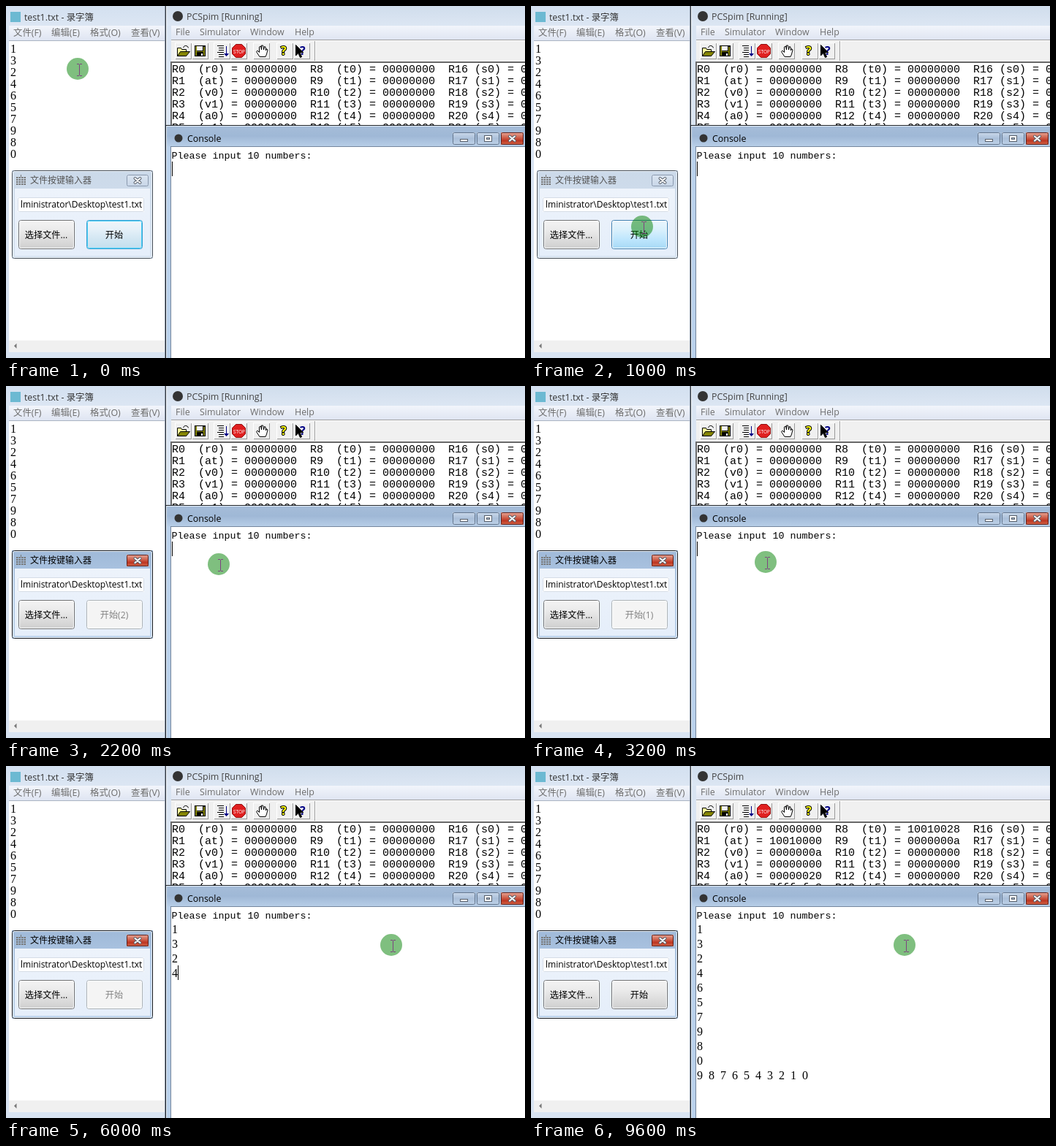
Animation, 710 px wide and 482 px high, one loop 9800 ms. Source, as an HTML page with a canvas:

```html
<!DOCTYPE html>
<html lang="zh">
<head>
<meta charset="utf-8">
<style>
html, body { margin: 0; width: 100%; height: 100%; overflow: hidden; background: #fff; }
canvas { display: block; }
</style>
</head>
<body>
<canvas id="stage" width="710" height="482"></canvas>
<script>
const ctx = document.getElementById('stage').getContext('2d');
const LOOP = 9800, STEP = 200;
const UI = '"Open Sans", "Noto Sans CJK SC", "Noto Sans CJK", sans-serif';
const MONO = '"Liberation Mono", monospace';
const SERIF = '"Liberation Serif", serif';
const DIGITS = [...'1324657980'];

// Timeline in ms
const CLICK = 1200, FOCUS = 2130, TYPE = 5200, KEY = 260, DONE = 7700, READY = 8200;

// Pointer stops: time, x, y
const PATH = [
  [0, 98, 86], [200, 104, 102], [400, 122, 165], [600, 142, 250], [800, 151, 299],
  [1200, 153, 305], [1400, 210, 283], [1600, 280, 251], [2000, 285, 248],
  [2400, 296, 240], [2600, 307, 240], [3000, 307, 240], [3200, 321, 241],
  [3600, 450, 245], [4000, 522, 245], [4200, 527, 245], [9400, 527, 245], [9600, 511, 245]
];

function rect(x, y, w, h, fill) {
  ctx.fillStyle = fill;
  ctx.fillRect(x, y, w, h);
}

function frame(x, y, w, h, color, r = 0) {
  ctx.strokeStyle = color;
  ctx.lineWidth = 1;
  ctx.beginPath();
  ctx.roundRect(x + .5, y + .5, w - 1, h - 1, r);
  ctx.stroke();
}

function shade(x, y, w, h, ...colors) {
  const g = ctx.createLinearGradient(0, y, 0, y + h);
  colors.forEach((c, i) => g.addColorStop(i / (colors.length - 1), c));
  rect(x, y, w, h, g);
}

function text(s, x, y, color = '#000', size = 12.4, family = UI) {
  ctx.font = `${size}px ${family}`;
  ctx.fillStyle = color;
  ctx.fillText(s, x, y);
}

function shape(points, fill, stroke) {
  ctx.beginPath();
  points.forEach(([x, y]) => ctx.lineTo(x, y));
  ctx.closePath();
  if (fill) { ctx.fillStyle = fill; ctx.fill(); }
  if (stroke) { ctx.strokeStyle = stroke; ctx.lineWidth = 1; ctx.stroke(); }
}

function dot(x, y, r, fill) {
  ctx.fillStyle = fill;
  ctx.beginPath();
  ctx.arc(x, y, r, 0, 7);
  ctx.fill();
}

function cross(x, y, color) {
  ctx.lineCap = 'round';
  for (const [c, w] of [['#58606c', 4], [color, 2]]) {
    ctx.strokeStyle = c;
    ctx.lineWidth = w;
    ctx.beginPath();
    ctx.moveTo(x - 3.5, y - 3); ctx.lineTo(x + 3.5, y + 3);
    ctx.moveTo(x + 3.5, y - 3); ctx.lineTo(x - 3.5, y + 3);
    ctx.stroke();
  }
  ctx.lineCap = 'butt';
}

function closeButton(x, y, w, h, active) {
  if (active) shade(x, y, w, h, '#e8a798', '#d4705c', '#bd3521', '#d4684a');
  else shade(x, y, w, h, '#dbe5f1', '#c8d6e8');
  frame(x, y, w, h, active ? '#5e2420' : '#8a99ae', 2);
  cross(x + w / 2, y + h / 2, '#fff');
}

function notepad() {
  shade(0, 0, 218, 27, '#d3e0f0', '#dce6f3');
  rect(0, 27, 218, 455, '#d9e4f2');
  rect(6, 8, 14, 14, '#6cb9d2');
  text('test1.txt - 录字簿', 25, 20, '#333');
  shade(4, 27, 214, 20, '#f2f5fb', '#dfe5f2');
  ['文件(F)', '编辑(E)', '格式(O)', '查看(V)'].forEach((s, i) =>
    text(s, [10, 62, 115, 171][i], 41, '#6d6d6d'));
  rect(4, 47, 214, 1, '#aab4c2');
  rect(4, 48, 214, 410, '#fff');
  DIGITS.forEach((d, i) => text(d, 6, 64 + 16 * i, '#000', 16, SERIF));
  rect(4, 458, 214, 16, '#f0f0f0');
  shape([[11, 465.5], [14.5, 462], [14.5, 469]], '#777');
}

function toolbar() {
  rect(226, 46, 484, 31, '#f0f0f0');
  rect(226, 46, 484, 1, '#a0a0a0');
  rect(226, 47, 484, 1, '#fff');
  rect(422, 48, 1, 27, '#a0a0a0');
  rect(423, 48, 1, 27, '#fff');
  for (const x of [231, 254, 284, 307, 338, 370, 393]) {
    rect(x, 50, 23, 23, '#fff');
    rect(x + 1, 51, 22, 22, '#9a9a9a');
    rect(x + 1, 51, 21, 21, '#f0f0f0');
  }
  // open
  shape([[234.5, 68.5], [234.5, 57.5], [239.5, 57.5], [240.5, 59.5], [246.5, 59.5], [246.5, 68.5]], '#ffff9c', '#000');
  shape([[234.5, 68.5], [238.5, 62.5], [251.5, 62.5], [246.5, 68.5]], '#848400', '#000');
  ctx.beginPath();
  ctx.arc(246, 58, 3.5, 3.4, 6.1);
  ctx.stroke();
  // save
  rect(258, 54, 15, 15, '#000');
  rect(259, 55, 2, 13, '#848400');
  rect(270, 56, 2, 12, '#848400');
  rect(261, 55, 8, 6, '#f0f0f0');
  rect(259, 62, 13, 1, '#848400');
  rect(267, 65, 2, 3, '#fff');
  // step
  for (let i = 0; i < 6; i++) rect(289 + (i % 3 ? 2 : 0), 54 + 3 * i, i % 3 ? 7 : 9, 1, '#000');
  rect(301, 55, 1, 12, '#000084');
  shape([[298, 65], [305, 65], [301.5, 69]], '#000084');
  // stop
  shape([[314.5, 52.5], [322.5, 52.5], [327.5, 57.5], [327.5, 65.5], [322.5, 70.5], [314.5, 70.5], [309.5, 65.5], [309.5, 57.5]], '#e02020', '#901010');
  text('STOP', 311, 64.5, '#fff', 6.5, 'bold, ' + UI);
  // hand
  shape([[347, 69.5], [342.5, 62.5], [344, 61], [346.5, 63.5], [346.5, 56], [348.5, 55], [349.5, 60], [349.5, 54], [351.5, 54], [352.5, 60], [353.5, 55.5], [355, 56], [355.5, 61], [356.5, 58.5], [358, 60], [356.5, 66], [355, 69.5]], '#fff', '#000');
  // help
  for (const [x, fill] of [[376, '#ff0'], [402, '#000084']]) {
    ctx.font = 'bold 16px ' + UI;
    ctx.strokeStyle = '#000';
    ctx.lineWidth = 2;
    if (x < 400) ctx.strokeText('?', x, 67);
    ctx.fillStyle = fill;
    ctx.fillText('?', x, 67);
  }
  arrow(396, 53, '#000', .85);
}

function arrow(x, y, fill, scale = 1) {
  const p = [[0, 0], [0, 17], [4, 13], [7, 20], [9.5, 19], [6.5, 12], [12, 12]];
  shape(p.map(([a, b]) => [x + .5 + a * scale, y + .5 + b * scale]), fill, '#000');
}

function registers(done) {
  const names = ['r0', 'at', 'v0', 'v1', 'a0', 'a1', 't0', 't1', 't2', 't3', 't4', 't5', 's0', 's1', 's2', 's3', 's4', 's5'];
  const results = { at: '10010000', v0: '0000000a', a0: '00000020', a1: '7fffefc8', t0: '10010028', t1: '0000000a' };
  ctx.save();
  ctx.beginPath();
  ctx.rect(227, 78, 483, 85);
  ctx.clip();
  names.forEach((name, i) => {
    const col = Math.floor(i / 6), row = i % 6;
    const value = done && results[name] || '00000000';
    const label = ('R' + (col * 8 + row)).padEnd(4);
    text(`${label}(${name}) = ${value}`, 227 + 189 * col, 91 + 16 * row, '#000', 15, MONO);
  });
  ctx.restore();
}

function simulator(done) {
  shade(218, 0, 492, 27, '#d0ddec', '#dce6f3');
  rect(218, 27, 8, 455, '#d9e4f2');
  rect(217, 0, 1, 482, '#8995a5');
  rect(218, 0, 1, 482, '#30363e');
  rect(219, 0, 1, 482, '#f4f8fc');
  dot(235, 14, 7, '#333');
  text(done ? 'PCSpim' : 'PCSpim [Running]', 247, 19, '#444');
  shade(226, 27, 484, 19, '#f2f5fb', '#dfe5f2');
  ['File', 'Simulator', 'Window', 'Help'].forEach((s, i) =>
    text(s, [232, 265, 334, 395][i], 40, '#6d6d6d'));
  toolbar();
  rect(225, 76, 485, 87, '#696969');
  rect(227, 78, 483, 85, '#fff');
  registers(done);
}

function caretShown(t) {
  if (t < CLICK) return t < 300 || t >= 830;
  if (t < FOCUS) return false;
  if (t < TYPE) return Math.floor((t - 3190 + 5300) / 530) % 2 === 0;
  if (t < DONE) return true;
  return t < 8520 || (t >= 9050 && t < 9580);
}

function consoleWindow(t) {
  const active = t < CLICK || t >= FOCUS;
  if (active) shade(218, 163, 492, 30, '#a6bdd9', '#9fb8d6', '#b9cfe8');
  else shade(218, 163, 492, 30, '#d0ddeb', '#d8e3f0', '#dce7f3');
  rect(218, 193, 8, 289, active ? '#b9d0ea' : '#d9e5f2');
  rect(218, 163, 492, 1, active ? '#1c2128' : '#596371');
  rect(218, 163, 1, 319, active ? '#1c2128' : '#596371');
  rect(219, 164, 491, 1, '#e8f1fa');
  rect(219, 164, 1, 318, '#e8f1fa');
  rect(225, 192, 485, 1, '#74869d');
  rect(225, 192, 1, 290, '#74869d');
  rect(226, 193, 484, 289, '#fff');
  dot(236, 181, 5.5, '#333');
  text('Console', 248, 186, active ? '#000' : '#555');

  for (const x of [611, 644]) {
    if (active) shade(x, 173, 31, 17, '#cbd9ea', '#abc0da', '#bfd2e8');
    else shade(x, 173, 31, 17, '#dde7f2', '#d0ddeb');
    frame(x, 173, 31, 17, active ? '#65778e' : '#8a99ae', 2);
  }
  rect(621, 182, 11, 4, '#58606c');
  rect(622, 183, 9, 2, '#fff');
  rect(654, 177, 11, 9, '#58606c');
  rect(655, 178, 9, 7, '#fff');
  rect(657, 180, 5, 3, '#58606c');
  rect(658, 181, 3, 1, '#b0c0d4');
  closeButton(677, 173, 31, 17, active);

  text('Please input 10 numbers:', 226.5, 209, '#000', 13.333, MONO);
  const typed = t < TYPE ? 0 : Math.min(10, Math.floor((t - TYPE) / KEY) + 1);
  for (let i = 0; i < typed; i++) text(DIGITS[i], 227, 229 + 20 * i, '#000', 16, SERIF);

  let cx = 227, row = typed;
  if (t >= DONE) {
    for (let i = 0; i < 10; i++) text(9 - i, 227 + 16 * i, 429, '#000', 16, SERIF);
    cx = 387;
  } else if (typed && (t - TYPE) % KEY < KEY / 2) {
    cx = 235;
    row--;
  }
  if (caretShown(t)) rect(cx, 213 + 20 * row, 1, 20, '#000');
}

function button(x, label, style) {
  const [fills, edge, ink] = {
    normal: [['#f3f3f3', '#ebebeb', '#dddddd', '#cfcfcf'], '#707070', '#000'],
    chosen: [['#f0f6fa', '#e4f0f8', '#d2e6f2', '#c3dfee'], '#3c9fd0', '#000'],
    hover: [['#eaf6fd', '#d9f0fc', '#bee6fd', '#a7d9f5'], '#3c7fb1', '#000'],
    disabled: [['#f4f4f4', '#f4f4f4'], '#adb2b5', '#838383']
  }[style];
  shade(x + 1, 294, 75, 38, ...fills);
  frame(x, 293, 77, 40, edge, 3);
  frame(x + 1, 294, 75, 38, style === 'chosen' ? '#48d0f8' : '#fafcfd', 2);
  ctx.textAlign = 'center';
  text(label, x + 38, 318, ink, 12.2);
  ctx.textAlign = 'left';
}

function dialog(t) {
  const active = t >= CLICK;
  if (active) shade(8, 225, 193, 121, '#9fb9d8', '#b4cce8', '#bdd3ec');
  else shade(8, 225, 193, 121, '#cbd9e9', '#d7e3f1');
  frame(8, 225, 193, 121, active ? '#14181e' : '#444c56', 3);
  frame(9, 226, 191, 119, '#edf4fb', 2);
  shade(12, 250, 185, 92, '#edf3fb', '#e5eefa');
  for (let y = 0; y < 4; y++)
    for (let x = 0; x < 4; x++) rect(14 + x * 3.5, 234 + y * 3, 2.5, 2, '#777');
  rect(20, 231, 1, 3, '#777');
  text('文件按键输入器', 33, 243, active ? '#000' : '#555', 12);
  closeButton(165, 231, 30, 16, active);

  rect(16, 262, 173, 20, '#fff');
  frame(16, 262, 173, 20, '#d5dce6', 2);
  text('lministrator\\Desktop\\test1.txt', 20, 276, '#000', 12);

  button(17, '选择文件...', 'normal');
  const left = 3 - Math.floor((t - CLICK) / 1000);
  if (t < 600) button(110, '开始', 'chosen');
  else if (t < CLICK) button(110, '开始', 'hover');
  else if (t < TYPE) button(110, `开始(${left})`, 'disabled');
  else button(110, '开始', t < READY ? 'disabled' : 'normal');
}

function pointer(t) {
  if (t >= 7600 && t < 9000) return;
  let i = PATH.length - 1;
  while (PATH[i][0] > t) i--;
  const a = PATH[i], b = PATH[i + 1] || a;
  const k = b === a ? 0 : (t - a[0]) / (b[0] - a[0]);
  const x = Math.round(a[1] + (b[1] - a[1]) * k);
  const y = Math.round(a[2] + (b[2] - a[2]) * k);
  dot(x, y, 15, 'rgba(0,128,0,.5)');
  if (t >= CLICK && t < FOCUS) return arrow(x, y, '#fff');
  const c = '#7d4380';
  rect(x + 2, y - 6, 1, 15, c);
  for (const top of [y - 7, y + 9]) {
    rect(x - 1, top, 3, 1, c);
    rect(x + 3, top, 3, 1, c);
  }
}

function draw(now) {
  const t = Math.floor((now % LOOP) / STEP) * STEP;
  notepad();
  simulator(t >= DONE);
  consoleWindow(t);
  dialog(t);
  pointer(t);
  requestAnimationFrame(() => draw(performance.now()));
}
draw(0);
</script>
</body>
</html>
```
